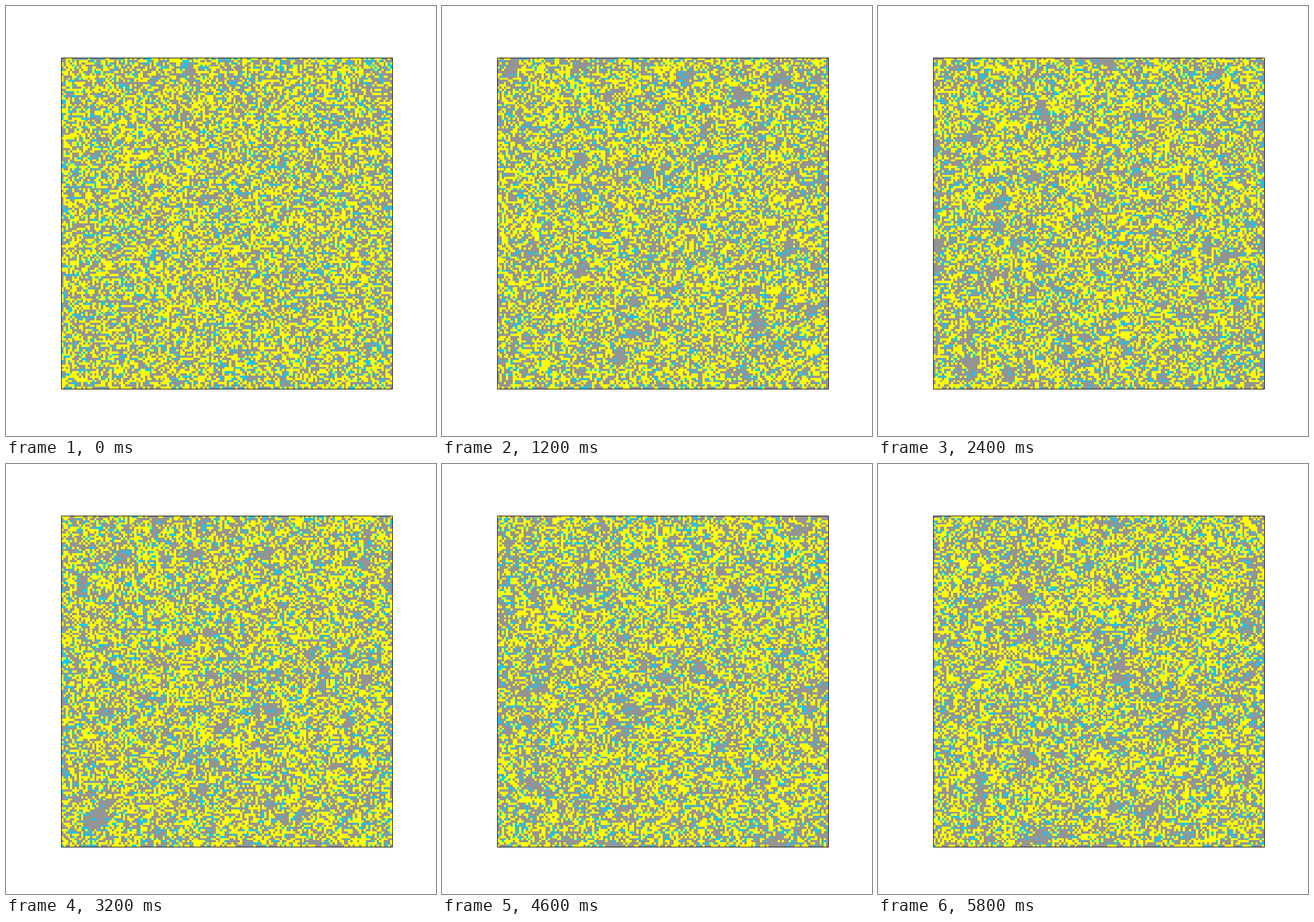
A matplotlib script that plays this animation: 748 by 748 pixels, repeating every 6 s.

```python
import numpy as np
import matplotlib.pyplot as plt
from matplotlib.animation import FuncAnimation
from matplotlib.colors import ListedColormap
from matplotlib.patches import Rectangle

SIZE, DPI = 748, 100
LEFT, TOP, SIDE = 96, 90, 576
CELLS = 150
FRAMES, INTERVAL = 30, 200
EMPTY, PREY, HUNTER = 0, 1, 2
P_PREY, P_HUNTER = 0.435, 0.105

rng = np.random.default_rng(11)
freq = np.fft.fftfreq(CELLS)
blur = np.exp(-2 * (np.pi * 1.9) ** 2 * (freq[:, None] ** 2 + freq ** 2))


def smooth_field():
    noise = rng.standard_normal((CELLS, CELLS))
    field = np.fft.ifft2(np.fft.fft2(noise) * blur).real
    return field / field.std()


def simulate(steps):
    """Cells are redrawn at random while drifting voids thin out the prey."""
    field = smooth_field()
    roll = rng.random((CELLS, CELLS))
    grids = []
    for step in range(steps):
        strength = min(1, step / 4)
        void = strength * (0.06 * field + 0.45 * np.clip(field - 1.6, 0, None))
        grid = np.full((CELLS, CELLS), EMPTY)
        grid[roll > 1 - P_PREY + void] = PREY
        grid[roll < P_HUNTER] = HUNTER
        grids.append(grid)
        field = 0.5 * field + np.sqrt(0.75) * smooth_field()
        moved = rng.random(roll.shape) < 0.7
        roll = np.where(moved, rng.random(roll.shape), roll)
    return grids


# The opening state is held for two ticks.
grids = simulate(FRAMES - 1)

fig = plt.figure(figsize=(SIZE / DPI, SIZE / DPI), dpi=DPI, facecolor="white")
ax = fig.add_axes([0, 0, 1, 1])
ax.axis("off")
image = ax.imshow(
    grids[0],
    cmap=ListedColormap(["#949494", "#ffff00", "#00ccff"]),
    vmin=0, vmax=2, interpolation="nearest", aspect="auto",
    extent=(LEFT, LEFT + SIDE, TOP + SIDE, TOP),
)
ax.add_patch(Rectangle((LEFT + 0.4, TOP + 0.4), SIDE, SIDE, fill=False,
                       edgecolor="black", linewidth=72 / DPI, snap=False))
ax.set_xlim(0, SIZE)
ax.set_ylim(SIZE, 0)


def update(frame):
    image.set_data(grids[max(frame - 1, 0)])
    return [image]


anim = FuncAnimation(fig, update, frames=FRAMES, interval=INTERVAL,
                     repeat=True, repeat_delay=0)
plt.show()
```
